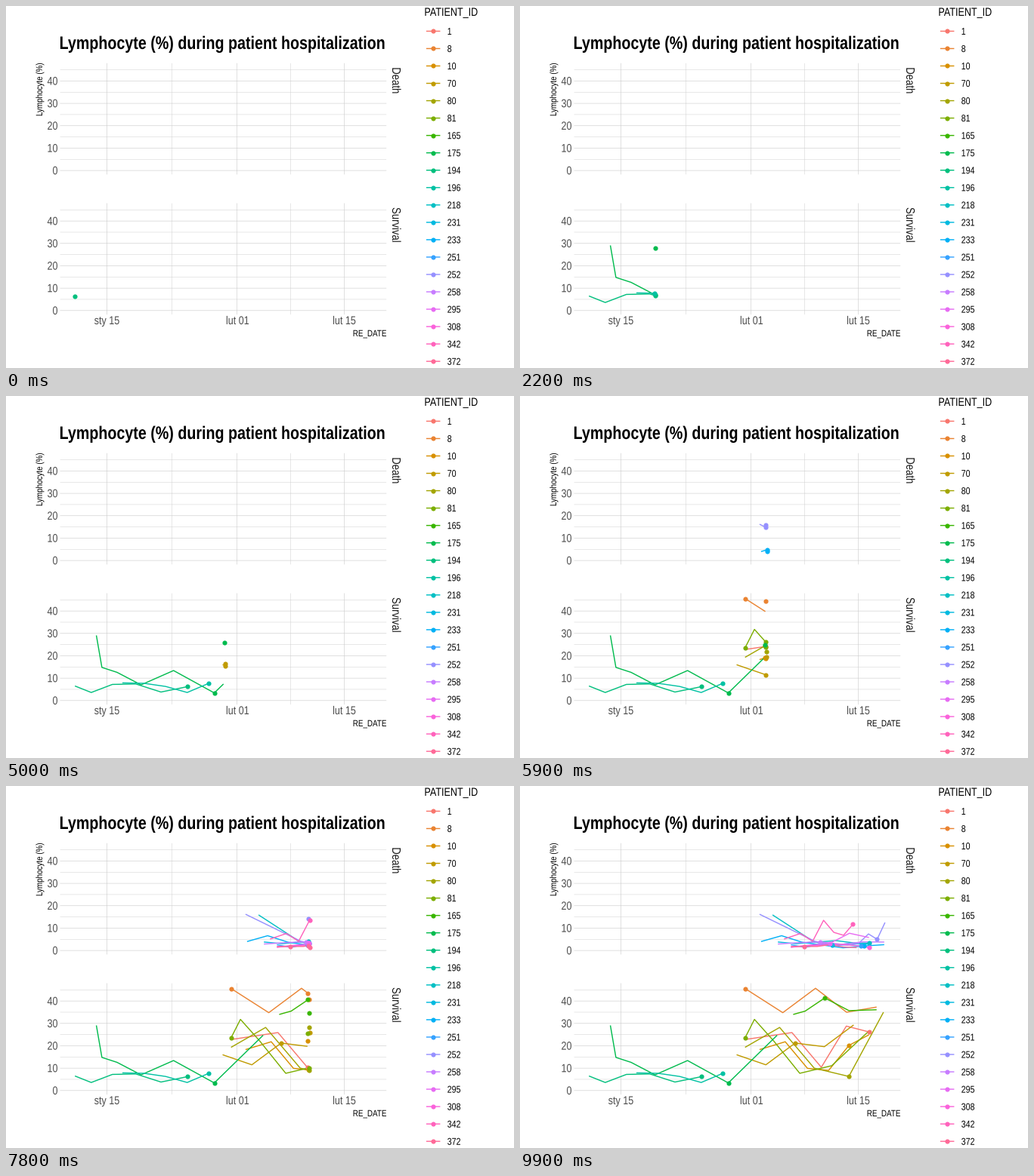
Animation, 672 px wide and 480 px high, one loop 10 s. Source, as a matplotlib script:

```python
import numpy as np
import matplotlib.pyplot as plt
from matplotlib.animation import FuncAnimation
from matplotlib.patches import PathPatch
from matplotlib.textpath import TextPath
from matplotlib.transforms import Affine2D

W, H, DPI = 672, 480, 96
PX = 72 / DPI                    # points per pixel
FRAMES, INTERVAL = 100, 100
PATIENTS = 20
LEFT, RIGHT = 71.8, 502.9
DAY_0, DAY = 91.2, 10.12         # stage x of the first record, pixels per day
SPAN = 38.74                     # days from first to last record
UNIT = 2.967                     # pixels per percentage point
ZERO = {"Death": 218.1, "Survival": 403.8}
CONDENSED = 0.82                 # narrow face
GREY = "#4d4d4d"

rng = np.random.default_rng(4)


def hcl(hue, chroma=100, light=65):
    """Polar CIE-LUV to sRGB."""
    a = np.radians(hue)
    u = chroma * np.cos(a) / (13 * light) + 0.19784
    v = chroma * np.sin(a) / (13 * light) + 0.46834
    y = ((light + 16) / 116) ** 3
    x = 9 * y * u / (4 * v)
    z = -x / 3 - 5 * y + 3 * y / v
    rgb = np.array([[3.2405, -1.5371, -0.4985],
                    [-0.9693, 1.8760, 0.0416],
                    [0.0556, -0.2040, 1.0572]]) @ [x, y, z]
    rgb = np.clip(rgb, 0, 1)
    return np.where(rgb > 0.00304, 1.055 * rgb ** (1 / 2.4) - 0.055, 12.92 * rgb)


fig = plt.figure(figsize=(W / DPI, H / DPI), dpi=DPI, facecolor="white")
ax = fig.add_axes([0, 0, 1, 1])
ax.set(xlim=(0, W), ylim=(H, 0))
ax.axis("off")


def label(x, y, text, size, color="black", align=0.0, turn=0, weight="normal"):
    """Text on baseline y; align 0, 0.5 or 1 puts x at its left, middle or right."""
    face = {"family": "Liberation Sans", "weight": weight}
    path = TextPath((0, 0), text, size=size, prop=face)
    shift = -align * path.get_extents().x1
    place = (Affine2D().translate(shift, 0).scale(CONDENSED, -1)
             .rotate_deg(turn).translate(x, y))
    ax.add_patch(PathPatch(place.transform_path(path), fc=color, lw=0, zorder=5))


def rule(xs, ys, major):
    ax.plot(xs, ys, color="#cccccc", lw=(0.6 if major else 0.45) * PX,
            snap=False, zorder=1)


def dots(color, xs=(), ys=()):
    return ax.plot(xs, ys, "o", color=color, ms=6.2 * PX, mew=0, zorder=4)[0]


def line(color, xs=(), ys=()):
    return ax.plot(xs, ys, color=color, lw=1.42 * PX, snap=False, zorder=3,
                   solid_capstyle="butt", solid_joinstyle="round")[0]


def draw_panel(name):
    zero = ZERO[name]
    for value in range(0, 50, 5):
        y = zero - UNIT * value
        rule((LEFT, RIGHT), (y, y), value % 10 == 0)
        if value % 10 == 0:
            label(68, y + 5.2, str(value), 15.33, GREY, align=1)
    for x, major in ((133.5, 1), (219.5, 0), (305.5, 1), (376.5, 0), (447.5, 1)):
        rule((x, x), (zero - 142, zero + 5), major)
    label(511, zero - 136.8, name, 16, "#1a1a1a", turn=90)


def draw_frame():
    for name in ZERO:
        draw_panel(name)
    for x, text in ((133.2, "sty 15"), (306, "lut 01"), (447.2, "lut 15")):
        label(x, 422, text, 15.33, GREY, align=0.5)
    label(70.6, 57, "Lymphocyte (%) during patient hospitalization", 24, weight="bold")
    label(48, 76, "Lymphocyte (%)", 12, align=1, turn=-90)
    label(503, 438, "RE_DATE", 12, align=1)
    label(553.4, 13, "PATIENT_ID", 15.33)


def between(a, b, t):
    return a[1] + (b[1] - a[1]) * (t - a[0]) / (b[0] - a[0])


class Patient:
    """Visits spread from day `first` to `until`; the file ends with visit `last`."""

    def __init__(self, color, zero, values, first, until, pace, last):
        days = first + (until - first) * np.linspace(0, 1, len(values)) ** pace
        self.path = [(round(d / SPAN * (FRAMES - 1)),
                      np.array((DAY_0 + DAY * d, zero - UNIT * v)))
                     for d, v in zip(days, values)]
        cut = (last + 1) % len(values)
        self.rows = self.path[cut:] + self.path[:cut]
        self.line, self.dots = line(color), dots(color)

    def trail(self, t):
        n = sum(k <= t for k, _ in self.path)
        seen = [p for _, p in self.path[:n]]
        if 0 < n < len(self.path):
            seen.append(between(self.path[n - 1], self.path[n], t))
        return seen

    def heads(self, t):
        # One dot for each pair of neighbouring rows that spans the moment.
        spots = [between(a, b, t) for a, b in zip(self.rows, self.rows[1:])
                 if min(a[0], b[0]) <= t < max(a[0], b[0])]
        if self.rows[-1][0] <= t:
            spots.append(self.rows[-1][1])
        return spots

    def show(self, t):
        for artist, pts in ((self.line, self.trail(t)), (self.dots, self.heads(t))):
            artist.set_data(*np.reshape(pts, (-1, 2)).T)


patients = []


def add(pid, panel, values, first=20.4, until=36.6, pace=1.0, last=-1):
    i = len(patients)
    color = hcl(15 + 360 * i / PATIENTS)
    y = 33.4 + 23.04 * i
    line(color, (555.9, 574.4), (y, y))
    dots(color, [565.2], [y])
    label(583.7, y + 4.6, str(pid), 13)
    patients.append(Patient(color, ZERO[panel], values, first, until, pace, last))


def survivor(pid, *values, **course):
    add(pid, "Survival", values, **course)


def victim(pid, *values, **course):
    add(pid, "Death", values, **course)


def low(level):
    """Six values wavering about a level."""
    return level + rng.uniform(-0.9, 0.9, 6)


draw_frame()

survivor(1, 22.8, 25.9, 10.4, 28.8, 26.2, pace=0.7)
survivor(8, 45.6, 34.8, 45.7, 35, 37.3, until=37.6, pace=0.9, last=0)
survivor(10, 18.3, 21.8, 9.9, 9, 20.2, 24.9, first=22.3, pace=0.9, last=4)
survivor(70, 16, 11.5, 21.2, 19.6, 29.3, first=19.3, until=34.6, last=2)
survivor(80, 19.3, 28.2, 10, 6.3, 35, until=38.5, last=3)
survivor(81, 23.5, 31.8, 22.2, 7.7, 11.1, 26.6, pace=1.6, last=0)
survivor(165, 34, 35.5, 41.4, 35.7, 36.1, first=26.7, until=37.6, pace=1.4, last=2)
survivor(175, 29.1, 14.8, 12.6, 7, 13.4, 3.4, 24.7, first=2.8, until=24.6, pace=1.9, last=5)
survivor(194, 6.5, 3.6, 7.2, 7.4, 3.8, 6.2, first=0, until=14.7, pace=1.2)
survivor(196, 7.9, 7.7, 6.3, 3.6, 7.7, first=6.2, until=17.5)

victim(218, 15.9, 3.7, 4.4, 3.4, 3.3, first=24, pace=0.6)
victim(231, *low(3), first=24.7, last=3)
victim(233, 4, 6.6, 3.7, 2.4, 1.2, 2, 2.6, first=22.5, until=38.6, last=5)
victim(251, *low(2), first=26.4, until=35.6)
victim(252, 16.2, 4.1, 2.6, 2.4, 3.2, 7.4, 5, 12.5, first=22.3, until=38.7, pace=0.42, last=6)
victim(258, *low(3), first=24.7, until=38.6, last=2)
victim(295, 1.5, 2.4, 3.2, 7.7, 5.8, first=26.4, last=2)
victim(308, *low(2), first=26.4)
victim(342, 5.1, 7.6, 4.1, 13.5, 8.1, 6.8, 11.7, first=25.5, until=34.5, pace=0.8)
victim(372, *low(1.8), first=26.4, until=35, last=1)


def update(t):
    for patient in patients:
        patient.show(t)
    return []


anim = FuncAnimation(fig, update, frames=FRAMES, interval=INTERVAL,
                     init_func=lambda: update(0), repeat=True, repeat_delay=0)
plt.show()
```
